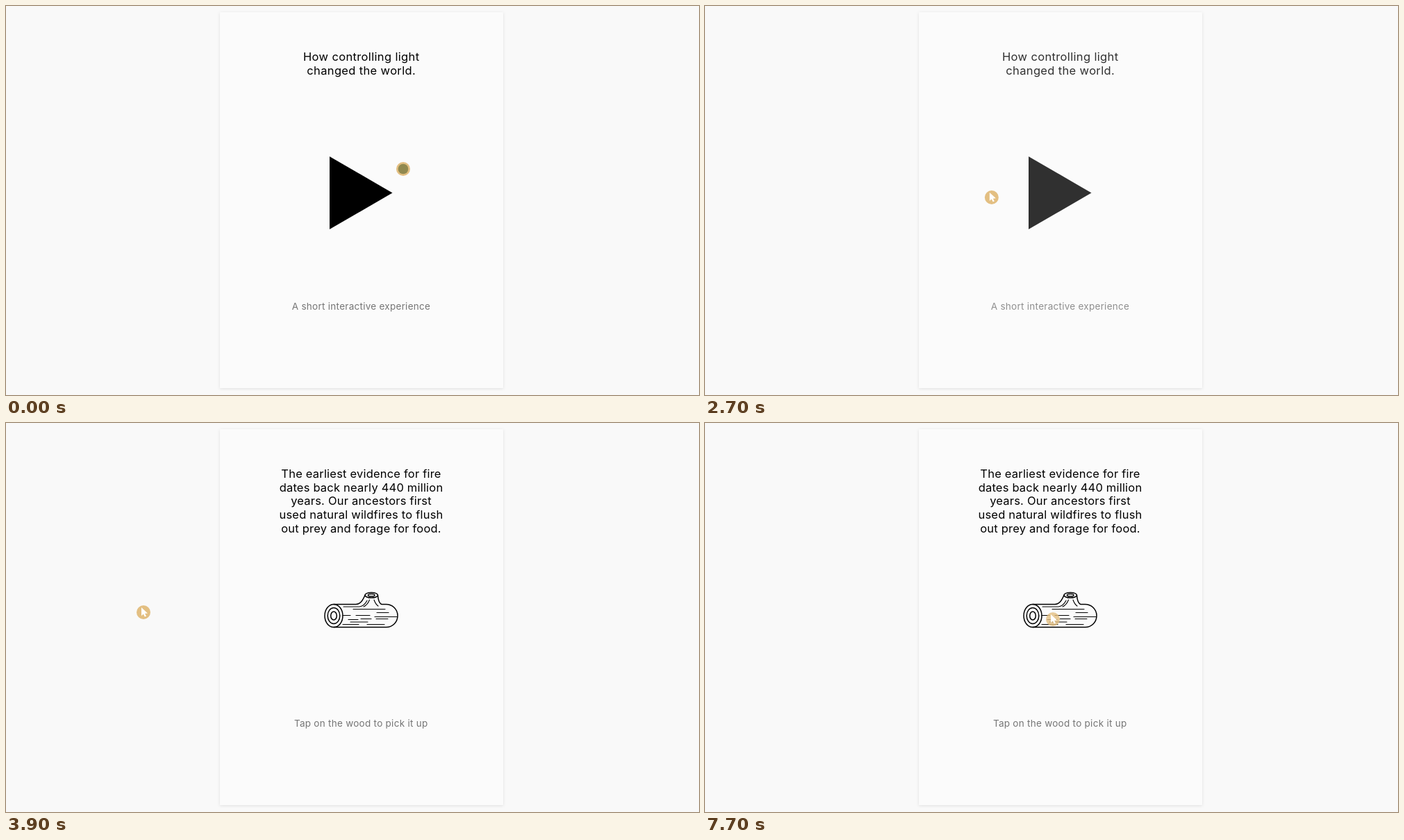
Write an HTML page that moves like this. It is 998 px wide and 561 px high and loops after 8000 ms.

```html
<!DOCTYPE html>
<html lang="en">
<head>
<meta charset="utf-8">
<style>
html, body { margin: 0; width: 100%; height: 100%; overflow: hidden; background: #f9f9f9; }
svg { display: block; width: 998px; height: 561px; font-family: Inter, "Open Sans", sans-serif; }
.card { fill: #fbfbfb; filter: drop-shadow(0 1px 2px rgba(0, 0, 0, .1)); }
text { text-anchor: middle; font-size: 16.5px; }
#intro text { letter-spacing: .35px; }
#story text { letter-spacing: .2px; }
#stage .note { font-size: 13.5px; letter-spacing: .27px; fill: #757575; }
.log { fill: none; stroke: #000; stroke-width: 1.5; stroke-linecap: round; stroke-linejoin: round; }
.grain { stroke-width: 1.1; }
</style>
</head>
<body>
<svg id="stage" viewBox="0 0 998 561">
  <rect class="card" x="308" y="9" width="408" height="542"/>
  <g id="intro">
    <text x="511.7" y="79">How controlling light</text>
    <text x="511.7" y="98.6">changed the world.</text>
    <path d="M466 217L556.5 269.5L466 322Z"/>
    <text class="note" x="511.5" y="437.5">A short interactive experience</text>
  </g>
  <g id="story">
    <text x="511.5" y="79">The earliest evidence for fire</text>
    <text x="511.5" y="98.6">dates back nearly 440 million</text>
    <text x="511.5" y="118.2">years. Our ancestors first</text>
    <text x="511.5" y="137.8">used natural wildfires to flush</text>
    <text x="511.5" y="157.5">out prey and forage for food.</text>
    <g class="log">
      <ellipse cx="472" cy="278" rx="13" ry="16.5"/>
      <ellipse cx="472" cy="278" rx="8.8" ry="11.5"/>
      <ellipse cx="472" cy="278" rx="4.3" ry="6"/>
      <path d="M472 261.5H504C511 261 514 255 517 248.5M535.5 248.5C536 255 537 260 541 261.5H547.5A16.5 16.5 0 0 1 547.5 294.5H472"/>
      <ellipse cx="526.2" cy="248.3" rx="9.3" ry="3.8"/>
      <ellipse cx="526.2" cy="248.3" rx="4.8" ry="1.8"/>
      <path class="grain" d="M486 265H509C515 264 518 260 520 256M515 265C519 263 522 259 523.5 255M530 255Q532 261 536 264M500 268.5H546M534 273.5H551M485 277.5H496M504 277.5H524M531 279.5H563M511 282.5H526M533 282.5H550M493 283.5H507M496 287H521M485 290.5H508M520 290.5H545"/>
    </g>
    <text class="note" x="511.2" y="437.5">Tap on the wood to pick it up</text>
  </g>
  <g id="cursor">
    <circle id="halo" r="10"/>
    <circle id="dot" r="7.3" fill="#91894f"/>
    <path id="arrow" d="M-3 -7V5L-.2 2.6L1.9 6.6L4 5.5L2 1.7L6 1.4Z" fill="#fff"/>
  </g>
</svg>
<script>
const LOOP = 8000, STEP = 100;
const $ = id => document.getElementById(id);
const clamp = v => Math.max(0, Math.min(1, v));
const ramp = (t, a, b) => clamp((t - a) / (b - a));
const ease = p => p * p * (3 - 2 * p);

// Cursor stops: time, x, y
const path = [
  [0, 572, 235], [500, 487, 272], [600, 487, 272], [1000, 471, 278], [1300, 483, 270],
  [1600, 483, 270], [1700, 488, 277], [2600, 488, 277], [2900, 198, 273],
  [5200, 198, 273], [5500, 200, 270], [6700, 200, 270], [6900, 201, 270],
  [7000, 201, 270], [7700, 501, 283], [LOOP, 501, 283]
];

function cursorAt(t) {
  const i = path.findIndex(p => p[0] > t);
  const [t0, x0, y0] = path[i - 1], [t1, x1, y1] = path[i];
  const k = ease(ramp(t, t0, t1));
  return [x0 + (x1 - x0) * k, y0 + (y1 - y0) * k];
}

function draw(now) {
  const t = Math.floor(now % LOOP / STEP) * STEP;
  const [x, y] = cursorAt(t);
  const onPlay = t < 2700 && x > 466 && Math.abs(y - 269.5) < (556.5 - x) * .58;
  const idle = t < STEP;
  $('intro').setAttribute('opacity', 1 - ramp(t, 2640, 2950));
  $('story').setAttribute('opacity', ramp(t, 2950, 3800));
  $('cursor').setAttribute('transform', `translate(${x} ${y})`);
  $('halo').setAttribute('fill', onPlay ? '#686868' : '#e3bf82');
  $('halo').setAttribute('opacity', t > 7500 ? .8 : 1);
  $('dot').setAttribute('opacity', idle ? 1 : 0);
  $('arrow').setAttribute('opacity', idle ? 0 : 1);
  requestAnimationFrame(draw);
}
requestAnimationFrame(draw);
</script>
</body>
</html>
```
